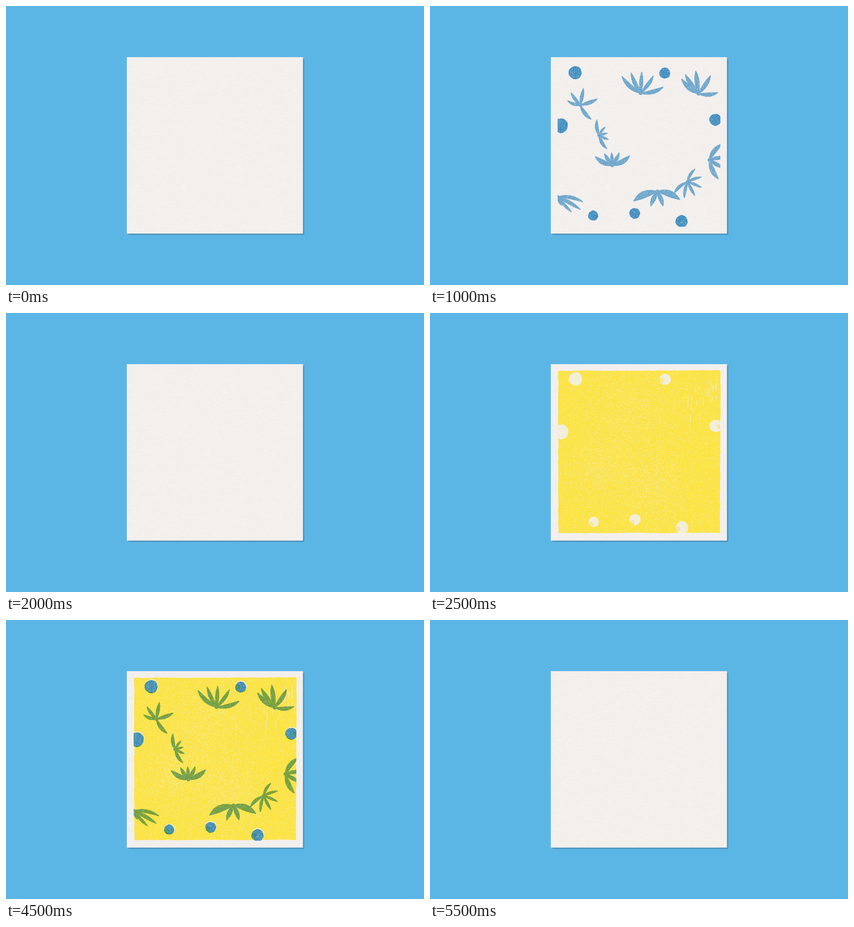
Animation, 917 px wide and 611 px high, one loop 6000 ms. Source, as an HTML page with a canvas:

```html
<!DOCTYPE html>
<html lang="en">
<head>
<meta charset="utf-8">
<title>Strawberry print</title>
<style>
  html, body { margin: 0; height: 100%; overflow: hidden; background: #5cb6e5; }
  canvas { display: block; width: 100vw; height: 100vh; }
</style>
</head>
<body>
<canvas id="stage" width="917" height="611"></canvas>
<script>
const W = 917, H = 611, TAU = Math.PI * 2;
const LEFT = 265, TOP = 112, SIZE = 386;
const YELLOW = '#fbe342', RED = '#ff6650', LEAF = '#72b0da', BERRY = '#4397cf';
const stage = document.getElementById('stage').getContext('2d');

let seed = 7;
function random() {
  seed = (seed + 0x6D2B79F5) | 0;
  let t = Math.imul(seed ^ (seed >>> 15), 1 | seed);
  t = (t + Math.imul(t ^ (t >>> 7), 61 | t)) ^ t;
  return ((t ^ (t >>> 14)) >>> 0) / 4294967296;
}
const jitter = amount => (random() - 0.5) * 2 * amount;

function makeLayer() {
  const canvas = document.createElement('canvas');
  canvas.width = W;
  canvas.height = H;
  return canvas.getContext('2d', { willReadFrequently: true });
}

function clipToPrint(ctx) {
  ctx.beginPath();
  ctx.rect(280, 124, 357, 359.5);
  ctx.clip();
}

function ellipse(ctx, x, y, rx, ry, angle = 0) {
  ctx.beginPath();
  ctx.ellipse(x, y, rx, ry, angle, 0, TAU);
}

// A slightly uneven disc, as if cut by hand.
function disc(ctx, x, y, r) {
  ctx.beginPath();
  for (let a = 0; a < TAU; a += TAU / 40) {
    const wobble = r * (1 + 0.025 * Math.sin(3 * a + x) + 0.015 * Math.sin(7 * a + y));
    ctx.lineTo(x + wobble * Math.cos(a), y + wobble * Math.sin(a));
  }
  ctx.fill();
}

// Visits every pixel of the paper.
function editPixels(ctx, edit) {
  const image = ctx.getImageData(LEFT, TOP, SIZE, SIZE);
  for (let p = 0; p < SIZE * SIZE; p++) {
    edit(image.data, p * 4, (p % SIZE) / SIZE, Math.floor(p / SIZE) / SIZE);
  }
  ctx.putImageData(image, LEFT, TOP);
}

// Thins the ink at random pixels; density gives the share of worn pixels.
function wear(ctx, keep, density) {
  editPixels(ctx, (px, i, x, y) => {
    if (random() < density(x, y)) px[i + 3] *= keep + random() * 0.3;
  });
}

// Blueberries: centre, radius and the direction of the ring, if it shows.
const blueberries = [
  { x: 318.5, y: 146, r: 14.3 },
  { x: 515, y: 147, r: 12, ring: Math.PI },
  { x: 286.5, y: 262, r: 16 },
  { x: 625.8, y: 249, r: 13, ring: 0 },
  { x: 358, y: 459, r: 11, ring: 2.5 },
  { x: 449, y: 454.2, r: 11.8, ring: 2.5 },
  { x: 552, y: 471.5, r: 13.3, ring: 3.1 },
];

function drawRings(ctx, color) {
  ctx.strokeStyle = color;
  ctx.lineWidth = 1.6;
  for (const { x, y, r, ring } of blueberries) {
    if (ring === undefined) continue;
    ellipse(ctx, x + 0.55 * r * Math.cos(ring), y + 0.55 * r * Math.sin(ring), 2.6, 3.8);
    ctx.stroke();
  }
}

function makePaper() {
  const ctx = makeLayer();
  ctx.fillStyle = '#5cb6e5';
  ctx.fillRect(0, 0, W, H);
  ctx.shadowColor = ctx.fillStyle = '#4a90b8';
  ctx.shadowBlur = 1.5;
  ctx.fillRect(269, 116, 385, 385);
  ctx.shadowBlur = 0;
  ctx.fillStyle = '#f2efed';
  ctx.fillRect(LEFT, TOP, SIZE + 0.5, SIZE + 0.5);
  let grain = 0;
  editPixels(ctx, (px, i) => {
    grain = grain * 0.6 + jitter(2);
    for (let c = 0; c < 3; c++) px[i + c] += grain;
  });
  return ctx.canvas;
}

function makeYellow() {
  const ctx = makeLayer();
  ctx.fillStyle = YELLOW;
  ctx.beginPath();
  const corners = [[281, 126.5], [637.5, 125.5], [636, 481.5], [281.5, 482]];
  corners.forEach(([x, y], i) => {
    const [nx, ny] = corners[(i + 1) % 4];
    for (let t = 0; t < 1; t += 1 / 30) {
      ctx.lineTo(x + (nx - x) * t + jitter(0.6), y + (ny - y) * t + jitter(0.6));
    }
  });
  ctx.fill();

  const patch = (x, y, cx, cy, r) => Math.exp(-(((x - cx) / r) ** 2) - ((y - cy) / r) ** 2);
  wear(ctx, 0.4, (x, y) => 0.12 + 0.22 * patch(x, y, 0.58, 0.7, 0.17)
    + 0.18 * patch(x, y, 0.27, 0.6, 0.15) + 0.15 * patch(x, y, 0.45, 0.28, 0.25));

  ctx.globalCompositeOperation = 'destination-out';
  ctx.fillStyle = 'rgba(0,0,0,.88)';
  for (const { x, y, r } of blueberries) disc(ctx, x + 0.9, y - 1.7, r + 0.3);
  for (let i = 0; i < 26; i++) {
    const x = 555 + random() * 75, y = x > 592 ? 140 + random() * 50 : 148 + random() * 80;
    ctx.fillRect(x, y, 0.7, 6 + random() * 14);
  }
  ctx.globalCompositeOperation = 'source-over';
  drawRings(ctx, YELLOW);
  return ctx.canvas;
}

function makeBlue() {
  const ctx = makeLayer();
  clipToPrint(ctx);
  ctx.fillStyle = ctx.strokeStyle = LEAF;
  ctx.lineWidth = 2;
  ctx.lineJoin = 'round';

  // Value at t on the parabola through first, middle and last.
  const through = ([first, middle, last], t) =>
    first * (1 - t) * (1 - 2 * t) + middle * 4 * t * (1 - t) + last * t * (2 * t - 1);

  // A fan of leaves; the outer ones arch outwards.
  function crown(x, y, count, degrees, lengths, fullness = 0.18) {
    for (let i = 0; i < count; i++) {
      const t = i / (count - 1), length = through(lengths, t);
      const bend = 0.16 * length * (2 * t - 1), width = fullness * length;
      ctx.save();
      ctx.translate(x, y);
      ctx.rotate(through(degrees, t) * Math.PI / 180);
      ctx.beginPath();
      ctx.moveTo(0, 0);
      ctx.quadraticCurveTo(length * 0.55, bend + width, length, 0);
      ctx.quadraticCurveTo(length * 0.5, bend - width, 0, 0);
      ctx.fill();
      ctx.stroke();
      ctx.restore();
    }
    ellipse(ctx, x, y, 4, 4);
    ctx.fill();
  }
  crown(462, 191, 5, [222, 273, 345], [55, 46, 51], 0.15);
  crown(589, 192, 5, [221, 263, 357], [49, 50, 42]);
  crown(330, 217, 5, [198, 280, 413], [29, 37, 39]);
  crown(371, 283, 5, [262, 346, 420], [34, 18, 34]);
  crown(400, 349, 5, [207, 267, 331], [42, 27, 43], 0.22);
  crown(280, 418, 4, [11, 38, 65], [56, 52, 20], 0.12);
  crown(499, 406, 4, [20, 92, 158], [52, 32, 56], 0.25);
  crown(565, 385, 6, [300, 402, 500], [32, 33, 38], 0.15);
  crown(613, 337, 4, [308, 370, 425], [44, 34, 46], 0.2);

  ctx.fillStyle = BERRY;
  for (const { x, y, r } of blueberries) disc(ctx, x, y, r);
  wear(ctx, 0.5, () => 0.22);
  return ctx.canvas;
}

function makeRed() {
  const ctx = makeLayer();
  clipToPrint(ctx);

  // Half width of a berry along its axis, from u = -1 (stem) to 1 (tip).
  const profile = u => Math.max(0, 1 - u * u) ** 0.4 * Math.exp(-0.5 * u) / 1.145;

  function strawberry(stemX, stemY, tipX, tipY, width, gap = 9) {
    const half = Math.hypot(tipX - stemX, tipY - stemY) / 2;
    ctx.save();
    ctx.translate((stemX + tipX) / 2, (stemY + tipY) / 2);
    ctx.rotate(Math.atan2(tipY - stemY, tipX - stemX));

    ctx.fillStyle = RED;
    ctx.beginPath();
    for (let a = 0; a < TAU; a += TAU / 90) {
      const u = -Math.cos(a);
      ctx.lineTo(u * half, Math.sign(Math.sin(a)) * profile(u) * width / 2);
    }
    ctx.fill();

    // Seeds in staggered rows, pointing towards the tip.
    ctx.globalCompositeOperation = 'destination-out';
    for (let x = 6 - half, row = 0; x < half - 4; x += gap * 0.75, row++) {
      const edge = profile(x / half) * width / 2 - 4;
      const step = gap * (1.25 - 0.3 * x / half);
      for (let col = -8; col <= 8; col++) {
        const y = (col + row % 2 / 2) * step;
        if (Math.abs(y) > edge) continue;
        ellipse(ctx, x + jitter(0.8), y + jitter(0.8), gap * 0.27, gap * 0.1, -y / (half * 2.5));
        ctx.fill();
      }
    }
    ctx.restore();
  }
  strawberry(335, 221, 402, 144, 72);
  strawberry(449, 186, 426, 323, 103, 10);
  strawberry(579, 180, 516, 287, 78);
  strawberry(371, 287, 294, 311, 58, 8);
  strawberry(303, 430, 343, 344, 68, 8);
  strawberry(401, 341, 404, 446, 77);
  strawberry(492, 404, 490, 295, 91, 7.5);
  strawberry(617, 326, 530, 297, 84);
  strawberry(564, 371, 616, 454, 74, 8);

  drawRings(ctx, RED);
  wear(ctx, 0.7, () => 0.05);
  return ctx.canvas;
}

const paper = makePaper(), yellow = makeYellow(), blue = makeBlue(), red = makeRed();

// Inks on the paper during each half second.
const steps = ['', 'y', 'b', 'r', '', 'y', 'yb', 'ybr', 'ybr', 'yb', 'y', ''];

function draw() {
  const inks = steps[Math.floor(performance.now() % 6000 / 500)];
  stage.globalCompositeOperation = 'source-over';
  stage.drawImage(paper, 0, 0);
  if (inks.includes('y')) stage.drawImage(yellow, 0, 0);
  stage.globalCompositeOperation = 'multiply';
  if (inks.includes('b')) stage.drawImage(blue, 0, 0);
  if (inks.includes('r')) stage.drawImage(red, 0, 0);
  requestAnimationFrame(draw);
}
draw();
</script>
</body>
</html>
```
